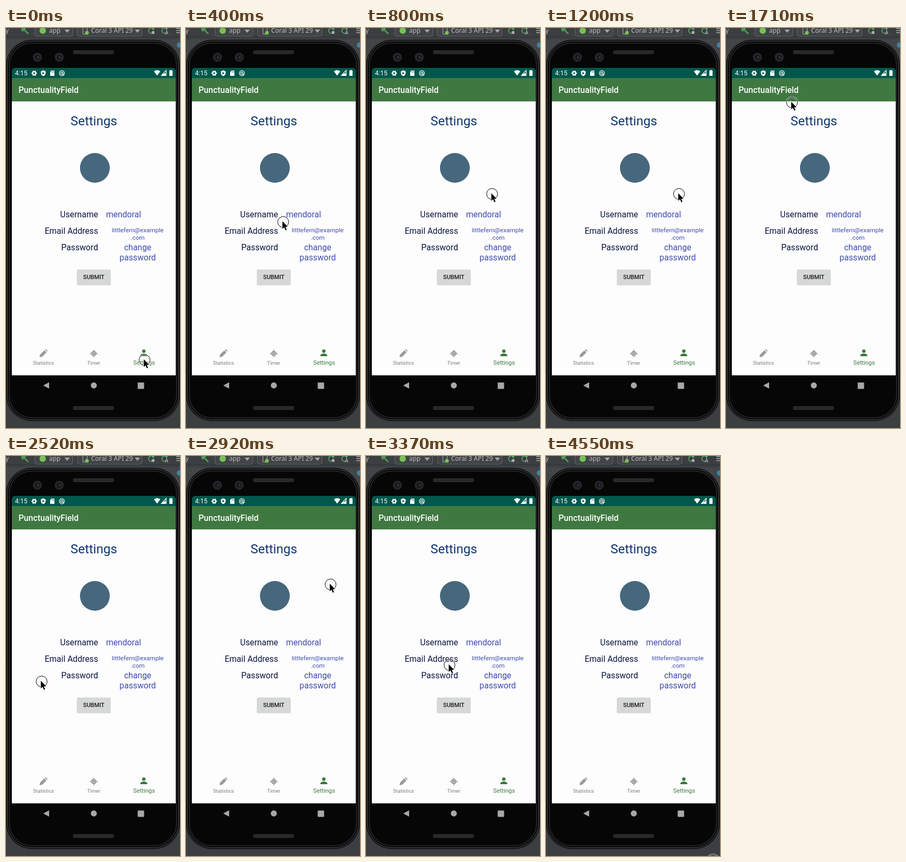
An HTML page with a canvas that plays this animation: 327 px wide and 752 px high, repeating every 4900 ms.

```html
<!DOCTYPE html>
<html lang="en">
<head>
<meta charset="utf-8">
<title>Settings screen</title>
<style>
  html, body { margin: 0; width: 100%; height: 100%; overflow: hidden; background: #3c3f41; }
  canvas { display: block; width: 327px; height: 752px; }
</style>
</head>
<body>
<canvas id="stage" width="327" height="752"></canvas>
<script>
const ctx = document.getElementById('stage').getContext('2d');
const LOOP = 4900;
const ROBOTO = 'Roboto, sans-serif';
const GREEN = '#3b7a3e';
const START = { x: 261, y: 625 };

// Each sweep runs to (x, y) by time `end`, swinging out by (dx, dy) halfway
const sweep = (end, x, y, dx = 0, dy = 0) => ({ end, x, y, dx, dy });
const sweeps = [
  sweep(570, 150, 505, 0, -275),
  sweep(800, 237, 312, -140, -165),
  sweep(1200, 250, 312, -100, 180),
  sweep(1710, 124, 140, -70, 210),
  sweep(2240, 150, 139, 27, -8),
  sweep(2520, 67, 424, -75, 0),
  sweep(2860, 305, 240, 40, 205),
  sweep(3370, 157, 393, -135, -130),
  sweep(3490, 202, 450),
  sweep(3680, 202, 450),
  sweep(4010, 302, 764),
  sweep(4400, 314, 780),
  sweep(4430, 314, 759),
  sweep(LOOP, 314, 759)
];

function tick(t) {
  const [start, step] = t < 2240 ? [60, 57] : [2240, 56.5];
  return Math.max(0, start + Math.floor((t - start + 5) / step) * step);
}

function pointerAt(t) {
  const i = sweeps.findIndex(s => t <= s.end + 4);
  const to = sweeps[i];
  const from = i ? sweeps[i - 1] : START;
  const begin = from.end || 0;
  const u = Math.min(1, Math.max(0, (t - begin) / (to.end - begin)));
  const swing = Math.sin(Math.PI * u) ** 2;
  return {
    x: from.x + (to.x - from.x) * u + to.dx * swing,
    y: from.y + (to.y - from.y) * u + to.dy * swing
  };
}

function rect(x, y, w, h, color) {
  ctx.fillStyle = color;
  ctx.fillRect(x, y, w, h);
}

function paint(fill, stroke, width = 1) {
  if (fill) { ctx.fillStyle = fill; ctx.fill(); }
  if (stroke) { ctx.strokeStyle = stroke; ctx.lineWidth = width; ctx.stroke(); }
}

function round(x, y, w, h, r, fill, stroke, width) {
  ctx.beginPath();
  ctx.roundRect(x, y, w, h, r);
  paint(fill, stroke, width);
}

function disc(x, y, r, fill, stroke, width) {
  ctx.beginPath();
  ctx.arc(x, y, r, 0, 2 * Math.PI);
  paint(fill, stroke, width);
}

function shape(d, x, y, fill, stroke, width) {
  ctx.save();
  ctx.translate(x, y);
  const p = new Path2D(d);
  if (stroke) { ctx.strokeStyle = stroke; ctx.lineWidth = width; ctx.stroke(p); }
  if (fill) { ctx.fillStyle = fill; ctx.fill(p); }
  ctx.restore();
}

function text(str, x, y, size, color, align = 'left', weight = 400, family = ROBOTO) {
  ctx.font = `${weight} ${size}px ${family}`;
  ctx.textAlign = align;
  ctx.fillStyle = color;
  ctx.fillText(str, x, y);
}

function drawToolbar() {
  const label = (s, x) => text(s, x, 9, 12, '#bbbbbb', 'left', 400, '"Noto Sans", sans-serif');
  const caret = x => shape('M-5-2H5L0 4Z', x, 5, '#a4a6a8');
  rect(0, 0, 327, 752, '#3c3f41');
  rect(0, 16, 327, 1, '#2f3133');
  rect(0, 21, 327, 36, '#434648');
  disc(326, 32, 5, '#3f83a8');
  label('y', -1);
  shape('M-7-3L-2-8L3-4L1-2L8 5L6 7L-1 0L-4 2Z', 35, 5, '#4f9a56');
  round(54.5, -8.5, 71, 24, 4, '#414547', '#62666a');
  round(134.5, -8.5, 121, 24, 4, '#414547', '#62666a');
  disc(69, 5, 6, '#78c257');
  label('app', 81);
  caret(115);
  round(144.5, -3.5, 8, 15, 1.5, null, '#aeb2b5');
  disc(152, 9, 3.5, '#78c257');
  label('Coral 3 API 29', 160);
  caret(247);
  for (const x of [273, 298]) {
    ctx.beginPath();
    ctx.arc(x, 5, 5, 0.8, 5.2);
    paint(null, '#59a869', 1.6);
    shape('M0-5L6-4L4 1Z', x, 4, '#59a869');
  }
  rect(274, 6, 5, 5, '#a9acae');
  text('A', 299, 12, 9, '#a9acae', 'left', 700);
  for (let y = 0; y < 12; y += 4) rect(320, y, 7, 1.5, '#a9acae');
}

function grille(y) {
  round(126, y, 77, 7, 3, '#303030');
  for (let x = 128; x < 201; x += 3) rect(x, y + 1, 1, 5, '#171717');
}

function drawPhone() {
  round(0.5, 22.5, 326, 716, 48, '#0b0b0b', '#161718');
  round(2.5, 24.5, 322, 712, 46, null, '#4f5051');
  round(6.5, 28.5, 314, 704, 42, '#060606', '#2a2a2b', 1.5);
  grille(42);
  grille(711);
  for (const x of [59, 100]) {
    disc(x, 55, 8, '#222326', '#2d2e30');
    disc(x, 55, 4, '#12151b');
    disc(x + 1, 55, 1.5, '#46505f');
  }
}

function drawStatusBar() {
  round(11, 75, 308, 19, [6, 6, 0, 0], '#00574b');
  text('4:15', 17, 89, 12, '#ffffff');
  disc(53, 85, 3, null, '#ffffff', 2.4);
  for (let i = 0; i < 6; i++) {
    const a = i * Math.PI / 3;
    disc(53 + 4.3 * Math.cos(a), 85 + 4.3 * Math.sin(a), 1.1, '#ffffff');
  }
  shape('M0-5.5L4.5-3.5V0Q4 4 0 5.5Q-4 4-4.5 0V-3.5Z', 70, 85, '#ffffff');
  shape('M-1.5-2.5L2.5 0L-1.5 2.5Z', 70, 85, '#00574b');
  shape('M-1.5-5H4V5H-4V-2.5Z', 87, 85, '#ffffff');
  for (let x = 85.5; x < 90; x += 1.9) rect(x, 81.5, 1, 2, '#00574b');
  disc(105, 85, 4.8, null, '#ffffff', 1.2);
  disc(105, 85, 2.2, null, '#ffffff', 1.2);
  shape('M1 1L4 4', 105, 85, null, '#ffffff', 1.3);
  shape('M-6-3Q0-7.5 6-3L0 5Z', 284, 84.5, '#ffffff');
  shape('M4-5V5H-5Z', 297, 84.5, null, '#ffffff', 1.2);
  shape('M4 0V5H-5L-2 2Z', 297, 84.5, '#ffffff');
  rect(307, 80, 6, 10, '#ffffff');
  rect(308.5, 79, 3, 1, '#ffffff');
}

function drawScreen() {
  const navy = '#0b1440', link = '#3f4bb0';
  const label = (s, y) => text(s, 173, y, 15.7, navy, 'right');
  const value = (s, y, size = 15.7) => text(s, 247.5, y, size, link, 'center');

  rect(11, 138, 308, 515, '#fdfdfd');
  drawStatusBar();
  rect(11, 94, 308, 44, '#3f7841');
  text('PunctualityField', 23.5, 122, 15.7, '#ffffff', 'left', 500);
  text('Settings', 165, 183, 24, '#10356f', 'center');
  disc(167, 263, 28, '#47677c');

  label('Username', 355.5);
  label('Email Address', 386.5);
  label('Password', 418);
  text('mendoral', 188, 355.5, 15.7, link);
  value('littlefern@example', 384, 11.7);
  value('.com', 398, 11.7);
  value('change', 418);
  value('password', 436.5);

  round(133, 455, 64, 29, 2, 'rgba(0,0,0,0.12)');
  round(133.5, 454, 63, 28.5, 2, '#d6d7d7');
  text('SUBMIT', 165, 472, 11, '#1d1d1d', 'center', 500);
}

function drawTabs() {
  const gray = '#9a9a9a';
  shape('M-7 7L-6 2L2-6L6-2L-2 6ZM3-7L5-8L8-5L7-3Z', 70, 612, gray);
  disc(165, 612, 5, gray);
  shape('M0-7.5V7.5M-7.5 0H7.5', 165, 612, null, gray, 1.4);
  disc(165, 612, 2.5, null, '#dddddd', 0.8);
  disc(259, 607.5, 3.2, GREEN);
  shape('M-6.5 5V3Q-5 0 0 0Q5 0 6.5 3V5Z', 259, 612, GREEN);
  text('Statistics', 70.5, 633, 9.5, '#7b7b7b', 'center');
  text('Timer', 165, 633, 9.5, '#7b7b7b', 'center');
  text('Settings', 259.5, 633, 11.2, GREEN, 'center');

  rect(11, 653, 308, 38, '#060606');
  shape('M5.5-6V6L-5.5 0Z', 75.5, 672, '#a8a8a8');
  disc(165, 672, 5.7, '#a8a8a8');
  round(247.5, 666.5, 12, 12, 1, '#a8a8a8');
}

function drawPointer({ x, y }) {
  disc(x, y, 10.3, null, 'rgba(255,255,255,0.75)', 2.4);
  disc(x, y, 10.3, null, '#000000');
  shape('M0 0V14.5L3.3 11.4L5.8 17L8 16L5.6 10.5H10Z', x - 1.5, y - 1.5,
    '#000000', '#ffffff', 1.8);
}

function render(now) {
  drawToolbar();
  drawPhone();
  drawScreen();
  drawTabs();
  drawPointer(pointerAt(tick(now % LOOP)));
}

const began = performance.now();
function loop() {
  render(performance.now() - began);
  requestAnimationFrame(loop);
}
loop();
</script>
</body>
</html>
```
